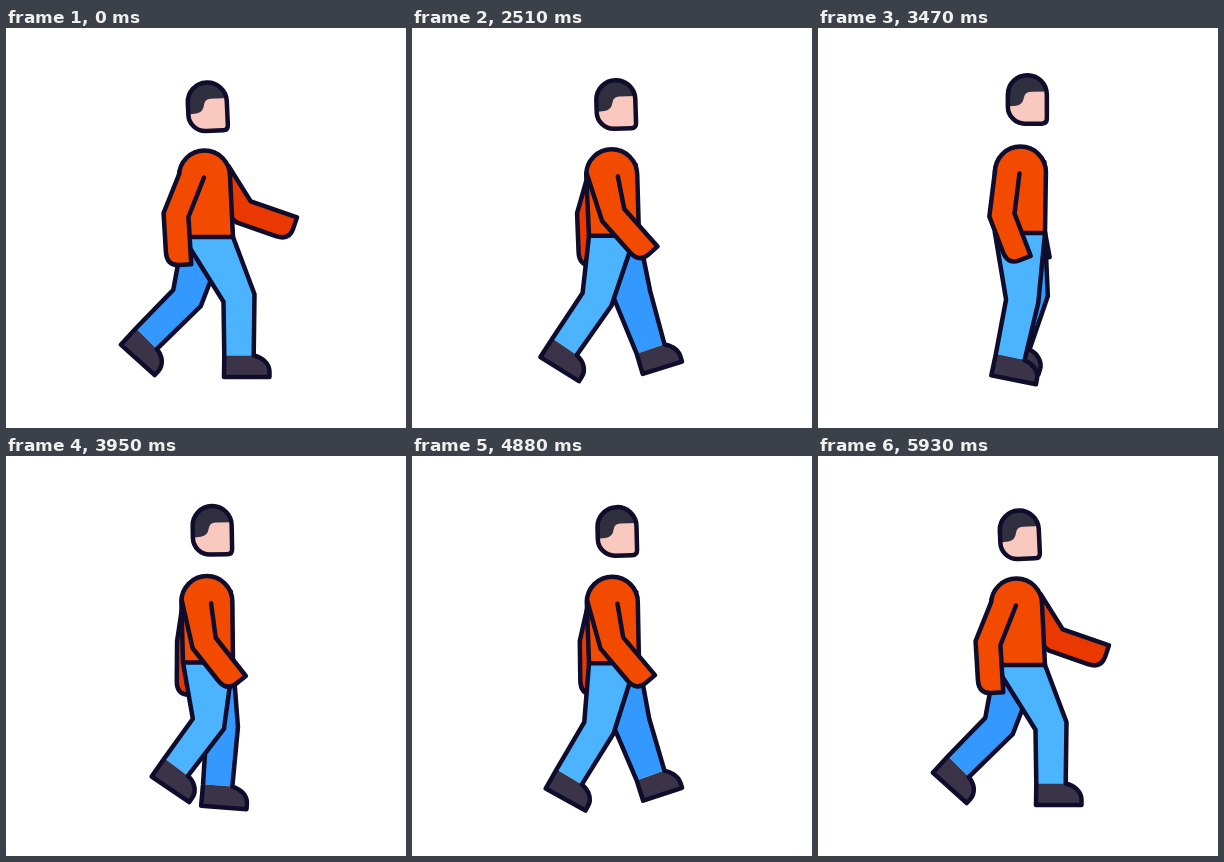
These frames come from a looping animation (400x400 px, 5960 ms). An HTML page with a canvas:

```html
<!DOCTYPE html>
<html lang="en">
<head>
<meta charset="utf-8">
<title>Walking man</title>
<style>
html, body { margin: 0; width: 100%; height: 100%; overflow: hidden; background: #fff; }
canvas { display: block; width: 400px; height: 400px; }
</style>
</head>
<body>
<canvas id="stage" width="400" height="400"></canvas>
<script>
const ctx = document.getElementById('stage').getContext('2d');
const LOOP = 5960, HOLD = 2000, STEP = 30, STEPS = 131;
const CYCLE_STEPS = 40, SETTLE_FROM = 118;
const COLOR = {
  line: '#100c2b', shirt: '#f24b00', sleeve: '#e93900', pants: '#4cb4ff',
  farPants: '#3399ff', shoe: '#3b3448', hair: '#302f3f', skin: '#f9c8bf'
};

const mix = (a, b, u) => a + (b - a) * u;
const easeIn = (u, power) => Math.pow(u, power);
const easeOut = (u, power) => 1 - Math.pow(1 - u, power);
const wave = (phase, mid, swing, second = 0) =>
  mid + swing * Math.cos(2 * Math.PI * phase) + second * Math.cos(4 * Math.PI * phase);

// Steady walk that settles into the standing pose at the end.
function walkPhase(step) {
  const steady = Math.min(step, SETTLE_FROM) / CYCLE_STEPS;
  const rest = Math.max(0, step - SETTLE_FROM) / (STEPS - SETTLE_FROM);
  return mix(steady, 3, easeOut(rest, 4));
}

// Knee, ankle and shin tilt: stance, swing, then heel strike.
function legPose(phase) {
  const p = phase % 1, lift = Math.sin(2 * Math.PI * p);
  let kneeX, tilt;
  if (p < .5) {
    const u = p / .5;
    kneeX = mix(233, 181, easeOut(u, 1.35));
    tilt = mix(0, 45, easeIn(u, 1.65));
  } else if (p < .85) {
    const u = (p - .5) / .35;
    kneeX = mix(181, 220, easeOut(u, 1.8));
    tilt = mix(45, -20, easeIn(u, 2));
  } else {
    const u = (p - .85) / .15;
    kneeX = mix(220, 233, easeIn(u, 4));
    tilt = mix(-20, 0, easeIn(u, 4));
  }
  tilt *= Math.PI / 180;
  const kneeY = 270 + 3 * lift, shin = 57.5 + 5 * Math.min(0, lift);
  return {
    knee: [kneeX, kneeY], tilt,
    ankle: [kneeX - shin * Math.sin(tilt), kneeY + shin * Math.cos(tilt)]
  };
}

const nearArmPose = p => ({
  elbow: [wave(p, 186.5, -16.5), 187],
  hand: [wave(p, 206.5, -33.5), wave(p, 231.5, 5.5)]
});

const farArmPose = p => ({
  elbow: [wave(p, 206, 32), wave(p, 186, -2)],
  hand: [wave(p, 221.5, 54.5, 11), wave(p, 226.5, -17.5, -8)]
});

function fill(path, color) {
  ctx.fillStyle = color;
  ctx.fill(path);
}

function stroke(path) {
  ctx.strokeStyle = COLOR.line;
  ctx.lineWidth = 4.5;
  ctx.lineJoin = ctx.lineCap = 'round';
  ctx.stroke(path);
}

function polygon(points) {
  const path = new Path2D();
  points.forEach(p => path.lineTo(...p));
  return path;
}

// Edge points of a limb that bends at the joint; a straight one can be wider there.
function limb(back, front, joint, end, endHalf, bentHalf, extra = 0) {
  const upper = Math.atan2(joint[1] - (back[1] + front[1]) / 2, joint[0] - (back[0] + front[0]) / 2);
  const lower = Math.atan2(end[1] - joint[1], end[0] - joint[0]);
  const mid = (upper + lower) / 2, bend = Math.abs(upper - lower);
  const half = bentHalf / Math.cos(bend / 2) + extra * Math.max(0, 1 - bend / .3);
  const off = (p, angle, d) => [p[0] + Math.sin(angle) * d, p[1] - Math.cos(angle) * d];
  return {
    lower,
    jointBack: off(joint, mid, -half), jointFront: off(joint, mid, half),
    endBack: off(end, lower, -endHalf), endFront: off(end, lower, endHalf)
  };
}

function drawLeg(phase, waist, color) {
  const { knee, ankle, tilt } = legPose(phase);
  const back = [177, waist], front = [227 - Math.max(0, 195 - knee[0]) * .4, waist];
  const l = limb(back, front, knee, ankle, 14.7, 15.5, 3);
  const turn = tilt * .93, cos = Math.cos(turn), sin = Math.sin(turn);
  const toe = 30.5 + 14 * Math.min(0, turn);
  const foot = (x, y) => [ankle[0] + x * cos - y * sin, ankle[1] + x * sin + y * cos];
  const addShoe = path => {
    path.lineTo(...foot(-15, 21.5));
    path.lineTo(...foot(toe, 21.5));
    path.lineTo(...foot(toe, 16));
    path.bezierCurveTo(...foot(toe, 8), ...foot(toe - 7, 2), ...l.endFront);
  };
  fill(polygon([back, l.jointBack, l.endBack, l.endFront, l.jointFront, front]), color);
  const shoe = polygon([l.endBack]);
  addShoe(shoe);
  fill(shoe, COLOR.shoe);
  const outline = polygon([back, l.jointBack, l.endBack]);
  addShoe(outline);
  outline.lineTo(...l.jointFront);
  outline.lineTo(...front);
  stroke(outline);
}

function drawArm({ elbow, hand }, back, front, color) {
  const l = limb(back, front, elbow, hand, 12.3, 12.3);
  const path = polygon([back, l.jointBack]);
  path.lineTo(l.endBack[0] - Math.cos(l.lower) * 14, l.endBack[1] - Math.sin(l.lower) * 14);
  path.quadraticCurveTo(...l.endBack, ...hand);
  path.lineTo(...l.endFront);
  path.lineTo(...l.jointFront);
  path.lineTo(...front);
  fill(path, color);
  stroke(path);
}

function drawTorso(x, y, waist) {
  const path = polygon([[227, waist], [x + 25.5, y]]);
  path.arc(x, y, 25.5, 0, Math.PI, true);
  path.lineTo(177, waist);
  path.closePath();
  fill(path, COLOR.shirt);
  stroke(path);
}

const head = new Path2D('M188 69A19.5 19.5 0 0 1 227 69V93Q227 98 222 98H205A17 17 0 0 1 188 81Z');
const hair = new Path2D('M184 45H231V66H211Q205 66 204 72Q203 79 196 80L184 81Z');

function drawHead(rise) {
  ctx.save();
  ctx.translate(201.5 + 8 * rise, 78.5 - 7.5 * rise);
  ctx.rotate(-.045 * (1 - rise));
  ctx.translate(-207.5, -73.5);
  fill(head, COLOR.skin);
  ctx.save();
  ctx.clip(head);
  fill(hair, COLOR.hair);
  ctx.restore();
  stroke(head);
  ctx.restore();
}

function draw(time) {
  const step = Math.max(0, Math.floor((time % LOOP - HOLD) / STEP));
  const phase = walkPhase(step);
  const rise = Math.pow(Math.abs(Math.sin(2 * Math.PI * phase)), 1.5);
  const x = 198.5 + 4 * rise, y = 148 - 4 * rise, waist = 209 - 4 * rise;
  const nearArm = nearArmPose(phase);

  ctx.fillStyle = '#fff';
  ctx.fillRect(0, 0, 400, 400);
  drawArm(farArmPose(phase), [x - 24, y + 1], [x + 24, y - 10], COLOR.sleeve);
  drawLeg(phase + .5, waist, COLOR.farPants);
  drawLeg(phase, waist, COLOR.pants);
  drawTorso(x, y, waist);
  drawArm(nearArm, [x - 25.3, y - 2], [198 + (nearArm.elbow[0] - 170) / 4, y + 1.5], COLOR.shirt);
  drawHead(rise);
}

const begin = performance.now();
function tick() {
  draw(performance.now() - begin);
  requestAnimationFrame(tick);
}
tick();
</script>
</body>
</html>
```
